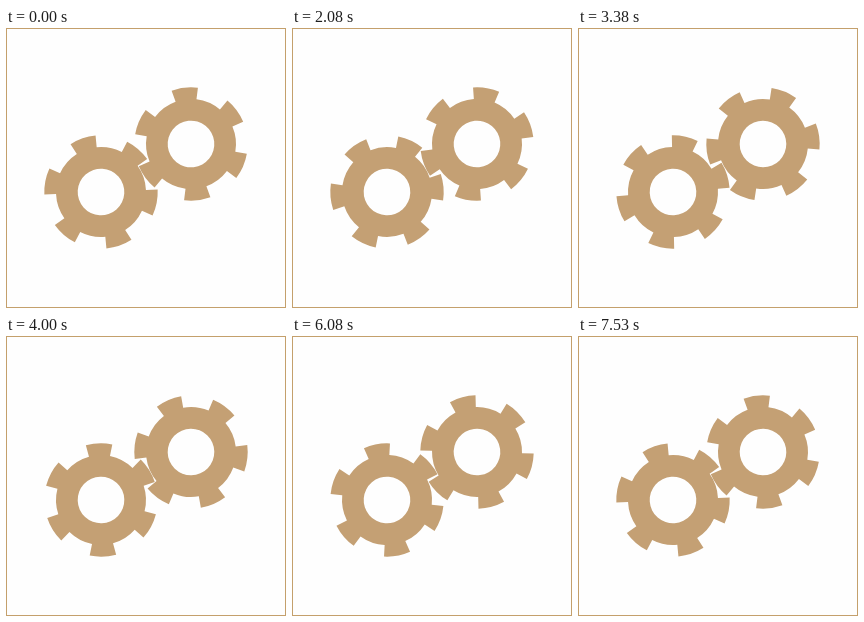
An HTML page that plays this animation: 280 by 280 pixels, repeating every 7.63 s.

```html
<!DOCTYPE html>
<html lang="en">
<head>
<meta charset="utf-8">
<title>Turning gears</title>
<style>
  html, body { margin: 0; width: 100%; height: 100%; overflow: hidden; background: #fefefe; }
  svg { display: block; width: 280px; height: 280px; }
</style>
</head>
<body>
<svg viewBox="0 0 280 280">
  <rect x=".5" y=".5" width="279" height="279" fill="#fefefe" stroke="#c4a06c"/>
  <g fill="#c4a074" fill-rule="evenodd">
    <path id="left"/>
    <path id="right"/>
  </g>
</svg>
<script>
  const LOOP = 7630;
  const TEETH = 6, HALF_TOOTH = 13.5;
  const TIP = 56.7, BODY = 45, HOLE = 23.3;
  const LEFT_START = -19, RIGHT_START = -6.5;

  // [time in ms, total turn in degrees, steps since the previous row]
  const turns = [
    [0, 0, 0],
    [2080, 764, 59],
    [2790, 1017.5, 21],
    [4000, 1457, 37],
    [5460, 1997, 45],
    [6680, 2460, 38],
    [7530, 2760, 27]
  ];

  const left = document.getElementById('left');
  const right = document.getElementById('right');

  // Angles run clockwise from the top.
  function polar(r, deg) {
    const a = deg * Math.PI / 180;
    return `${(r * Math.sin(a)).toFixed(3)} ${(-r * Math.cos(a)).toFixed(3)}`;
  }

  function gearPath() {
    const pitch = 360 / TEETH;
    let d = '';
    for (let i = 0; i < TEETH; i++) {
      const from = i * pitch - HALF_TOOTH, to = i * pitch + HALF_TOOTH;
      d += `${i ? 'L' : 'M'}${polar(BODY, from)}L${polar(TIP, from)}`
        + `A${TIP} ${TIP} 0 0 1 ${polar(TIP, to)}L${polar(BODY, to)}`
        + `A${BODY} ${BODY} 0 0 1 ${polar(BODY, from + pitch)}`;
    }
    return `${d}ZM0 ${-HOLE}A${HOLE} ${HOLE} 0 1 0 0 ${HOLE}A${HOLE} ${HOLE} 0 1 0 0 ${-HOLE}Z`;
  }

  function turnAt(t) {
    for (let i = 1; i < turns.length; i++) {
      const [t0, a0] = turns[i - 1];
      const [t1, a1, steps] = turns[i];
      if (t < t1) {
        const step = Math.floor((t - t0) / (t1 - t0) * steps + 1e-6);
        return a0 + (a1 - a0) * step / steps;
      }
    }
    return turns[turns.length - 1][1];
  }

  function draw(t) {
    const turn = turnAt(t);
    left.setAttribute('transform', `translate(95 164) rotate(${LEFT_START + turn})`);
    right.setAttribute('transform', `translate(185 116) rotate(${RIGHT_START - turn})`);
  }

  const shape = gearPath();
  left.setAttribute('d', shape);
  right.setAttribute('d', shape);

  const start = performance.now();
  function tick() {
    draw((performance.now() - start) % LOOP);
    requestAnimationFrame(tick);
  }
  draw(0);
  requestAnimationFrame(tick);
</script>
</body>
</html>
```
